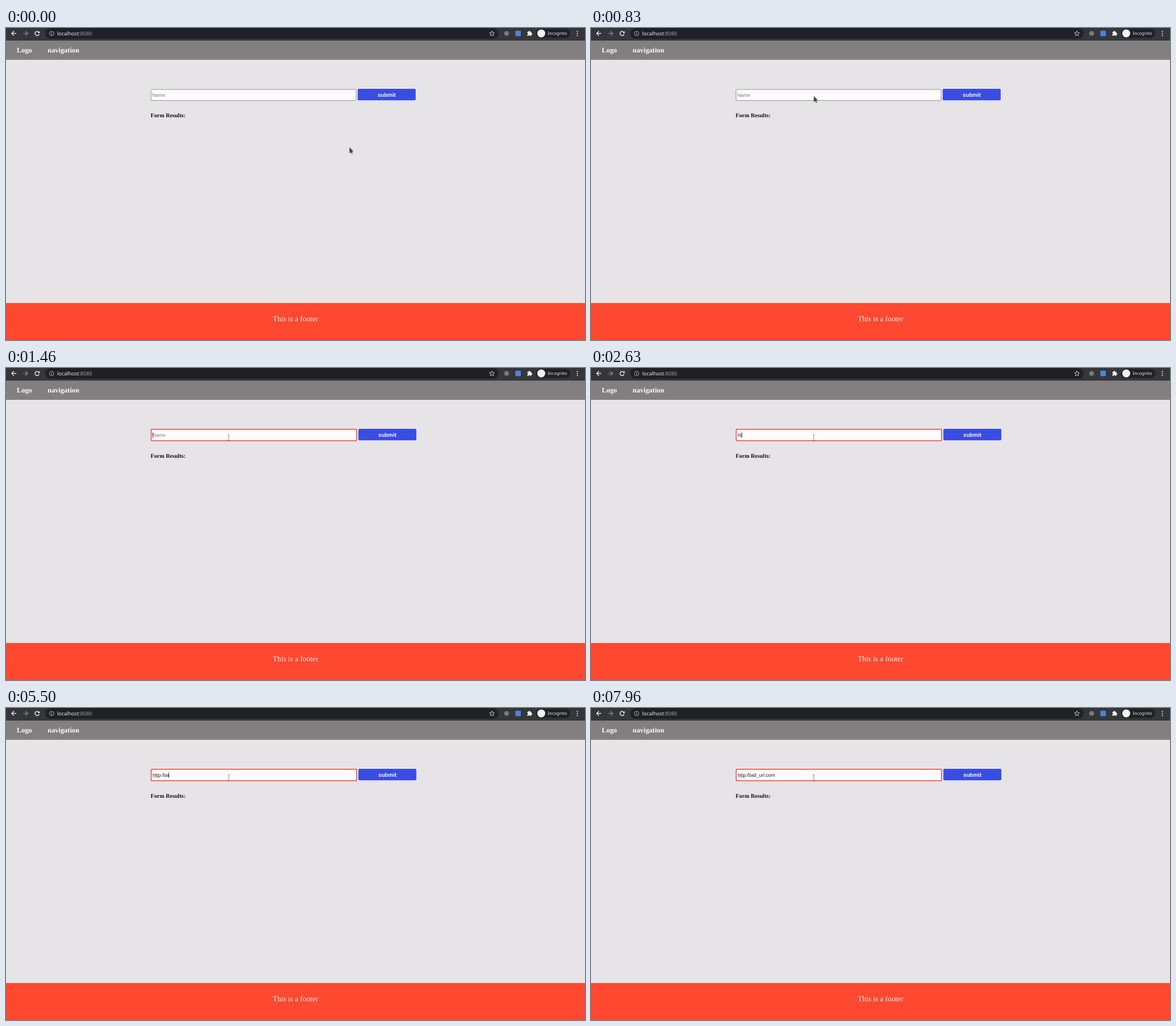
These frames come from a looping animation (1019x549 px, 8 s). An HTML page with a canvas:

```html
<!DOCTYPE html>
<html lang="en">
<head>
<meta charset="utf-8">
<title>Form demo</title>
<style>
  html, body { margin: 0; width: 100%; height: 100%; overflow: hidden; background: #e6e4e7; }
  canvas { display: block; width: 1019px; height: 549px; }
</style>
</head>
<body>
<canvas id="stage" width="1019" height="549"></canvas>
<script>
const ctx = document.getElementById('stage').getContext('2d');
const W = 1019, H = 549, LOOP = 8000, FPS = 24;

const SANS = '"Liberation Sans", Arial, sans-serif';
const SERIF = '"Liberation Serif", "Times New Roman", serif';
const UI = '"Noto Sans", "Open Sans", sans-serif';

// '<' is a backspace
const KEYS = 'http://<bad_url.com';
const KEY_TIMES = [2290, 2630, 2830, 3170, 3880, 4290, 4790, 5130, 5250, 5500,
  5670, 5920, 6380, 6420, 6670, 6960, 7130, 7250, 7420];
const CARET_OFF = [[1790, 2290], [3750, 3880], [7960, LOOP + 10]];
const FOCUS_AT = 1250, FOCUS_END = 1458, SPELL_AT = 4290, HOVER_AT = 958;

const mix = (a, b, p) => a + (b - a) * p;
const clamp = v => Math.min(1, Math.max(0, v));

function rect(x, y, w, h, color) {
  ctx.fillStyle = color;
  ctx.fillRect(x, y, w, h);
}

function pill(x, y, w, h, r, color) {
  ctx.fillStyle = color;
  ctx.beginPath();
  ctx.roundRect(x, y, w, h, r);
  ctx.fill();
}

function dot(x, y, r, color) {
  ctx.fillStyle = color;
  ctx.beginPath();
  ctx.arc(x, y, r, 0, Math.PI * 2);
  ctx.fill();
}

function ring(x, y, r, color, width, from = 0, to = Math.PI * 2) {
  ctx.strokeStyle = color;
  ctx.lineWidth = width;
  ctx.beginPath();
  ctx.arc(x, y, r, from, to);
  ctx.stroke();
}

function line(points, color, width) {
  ctx.strokeStyle = color;
  ctx.lineWidth = width;
  ctx.beginPath();
  points.forEach(([x, y]) => ctx.lineTo(x, y));
  ctx.stroke();
}

// Draws text and returns its width
function text(str, x, y, font, color, align = 'left') {
  ctx.font = font;
  ctx.fillStyle = color;
  ctx.textAlign = align;
  ctx.fillText(str, x, y);
  return ctx.measureText(str).width;
}

function arrow(x, dir, color) {
  line([[x - 4 * dir, 9.5], [x + 4 * dir, 9.5]], color, 1.3);
  line([[x, 5.5], [x + 4 * dir, 9.5], [x, 13.5]], color, 1.3);
}

function star(x, y, r) {
  const pts = [];
  for (let i = 0; i <= 10; i++) {
    const a = -Math.PI / 2 + i * Math.PI / 5, d = i % 2 ? r * 0.45 : r;
    pts.push([x + d * Math.cos(a), y + d * Math.sin(a)]);
  }
  line(pts, '#d5d7da', 0.9);
}

function puzzle(x, y) {
  const c = '#f1f3f4';
  pill(x - 4, y - 2.8, 7, 7, 0.8, c);
  dot(x - 0.5, y - 3, 1.5, c);
  dot(x + 3.2, y + 0.7, 1.5, c);
  dot(x - 4, y + 0.7, 1.2, '#35363a');
  dot(x - 0.5, y + 4.2, 1.2, '#35363a');
}

function toolbar() {
  const light = '#f1f3f4';
  rect(0, 0, W, 22.5, '#35363a');
  pill(69, 0, 798, 19, 9.5, '#202124');
  arrow(14, -1, light);
  arrow(34.3, 1, '#85868a');
  ring(54.8, 9.6, 3.7, light, 1.3, 0.3, 5.4);
  ctx.fillStyle = light;
  ctx.beginPath();
  ctx.moveTo(59.3, 5.2);
  ctx.lineTo(59.3, 9);
  ctx.lineTo(55.5, 9);
  ctx.fill();

  ring(80.3, 9.7, 3.9, '#b9bcc0', 0.9);
  rect(79.8, 9, 1, 3, '#b9bcc0');
  rect(79.8, 7.2, 1, 1, '#b9bcc0');
  const font = '9.1px ' + UI;
  const w = text('localhost', 90, 12.8, font, '#e8eaed');
  text(':8080', 90 + w, 12.8, font, '#9aa0a6');
  star(855.2, 9.8, 4.7);

  dot(881, 9.5, 4.3, '#77797c');
  rect(896.5, 4.8, 9.5, 9.5, '#4f83db');
  puzzle(921.5, 9.5);
  pill(933, 1.5, 60, 16, 8, '#202124');
  dot(942, 9.5, 7, light);
  text('Incognito', 953.5, 12.3, '7.6px ' + UI, '#e8eaed');
  [6, 9.6, 13.2].forEach(y => dot(1005.5, y, 1, light));
}

function page() {
  rect(0, 0, W, H, '#e6e4e7');
  rect(0, 22.5, W, 33.5, '#827f81');
  text('Logo', 19, 43.4, 'bold 12.35px ' + SERIF, '#fbfafb');
  text('navigation', 73.3, 43.4, 'bold 12.35px ' + SERIF, '#fbfafb');
  rect(0, 484, W, 65, '#ff4830');
  text('This is a footer', 509.5, 516.4, '13.3px ' + SERIF, '#fff1ee', 'center');
}

function typedAt(t) {
  let s = '';
  for (let i = 0; i < KEYS.length && t >= KEY_TIMES[i]; i++) {
    s = KEYS[i] === '<' ? s.slice(0, -1) : s + KEYS[i];
  }
  return s;
}

function spelling(x, width) {
  const pts = [];
  for (let d = 0; d <= width; d += 0.5) pts.push([x + d, 122.2 + 0.5 * Math.sin(d * 2.4)]);
  line(pts, 'rgba(235,60,60,0.75)', 0.7);
}

function form(t) {
  const p = clamp((t - FOCUS_AT + 20) / (FOCUS_END - FOCUS_AT + 20)) * (t >= FOCUS_AT);
  // Colour and sideways growth lead, thickness and downward growth follow
  const lead = Math.sqrt(p), lag = p * p;
  const border = mix(0.8, 1.5, lag);
  const x = 254.8, y = mix(107.8, 107, lag);
  const right = mix(616.6, 617.8, lead), bottom = mix(128, 128.7, lag);
  const color = `rgb(${mix(118, 238, lead)},${mix(116, 68, lag)},${mix(118, 58, lag)})`;

  pill(x, y, right - x, bottom - y, 2, color);
  pill(x + border, y + border, right - x - 2 * border, bottom - y - 2 * border, 1, '#fefcff');

  const tx = mix(257.2, 258, p), font = '8.5px ' + SANS;
  const typed = typedAt(t);
  let w = 0;
  if (typed) w = text(typed, tx, 121, font, '#1c1b1c');
  else text('Name', tx, 121, font, '#7b797b');
  if (t >= SPELL_AT) spelling(tx, 14);

  const caretOn = t >= FOCUS_AT && !CARET_OFF.some(([a, b]) => t >= a && t < b);
  if (caretOn) rect(tx + w - 0.1, 113.3, 0.8, 9.5, '#111');

  const shift = 1.2 * lead;
  pill(619 + shift, 107, 102, 20.3, 2, '#3a4de2');
  text('submit', 670 + shift, 121.1, 'bold 9.75px ' + SANS, '#f8f8ff', 'center');
  text('Form Results:', 254.5, 157.2 + 0.6 * lag, 'bold 10.15px ' + SERIF, '#111012');
}

function pointer(t) {
  if (t >= HOVER_AT) {
    const color = 'rgba(40,39,40,0.75)';
    rect(391.7, 117.8, 0.7, 9.2, color);
    [117.2, 127].forEach(y => rect(390.4, y, 3.3, 0.6, color));
    return;
  }
  // Sideways travel settles well before the upward travel does
  const u = clamp((Math.floor(t * FPS / 1000) - 2) / 20);
  const rest = 1 - u ** 1.5;
  const x = mix(392, 604.5, rest ** 5.13), y = mix(117.2, 209.8, rest ** 2.37);
  const shape = [[0, 0], [0, 10.7], [2.4, 8.6], [4.2, 12], [5.8, 11.1], [4.2, 7.9], [6.9, 7.3]];
  ctx.beginPath();
  shape.forEach(([dx, dy]) => ctx.lineTo(x + dx, y + dy));
  ctx.closePath();
  ctx.strokeStyle = 'rgba(245,244,246,0.4)';
  ctx.lineWidth = 0.8;
  ctx.stroke();
  ctx.fillStyle = '#454446';
  ctx.fill();
}

ctx.textRendering = 'geometricPrecision';

let start = null;
function tick(now) {
  if (start === null) start = now;
  const t = (now - start) % LOOP + 3;
  page();
  toolbar();
  form(t);
  pointer(t);
  requestAnimationFrame(tick);
}
requestAnimationFrame(tick);
</script>
</body>
</html>
```
